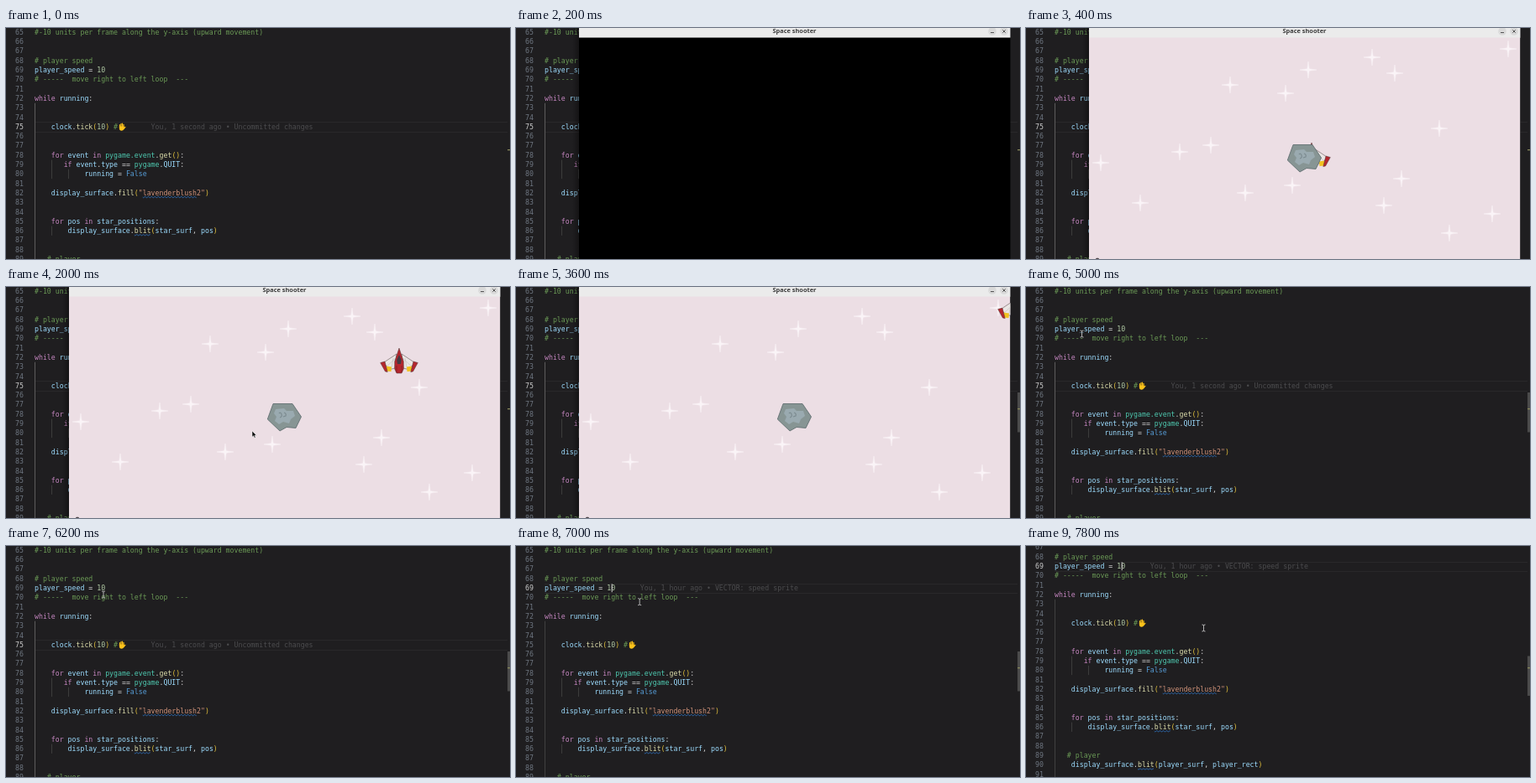
Write an HTML page that moves like this. It is 600x276 px and loops after 8000 ms.

```html
<!DOCTYPE html>
<html lang="en">
<head>
<meta charset="utf-8">
<title>Space shooter</title>
<style>
html, body { margin: 0; width: 100%; height: 100%; overflow: hidden; background: #1f1e20; }
svg { display: block; width: 600px; height: 276px; }
text { white-space: pre; font: 8.22px "DejaVu Sans Mono", monospace; }
.title { font: 700 7.4px "Open Sans", sans-serif; }
</style>
</head>
<body>
<svg id="stage" viewBox="0 0 600 276"></svg>
<script>
const NS = 'http://www.w3.org/2000/svg';
const STEP = 200, LOOP = 8000;
const CHAR = 4.95, ROW = 11.3, LEFT = 34;
const OPEN = 1, CLOSE = 19, CLICK = 33;
const stage = document.getElementById('stage');

function add(parent, tag, attrs = {}, text) {
  const el = document.createElementNS(NS, tag);
  for (const k in attrs) el.setAttribute(k, attrs[k]);
  if (text !== undefined) el.textContent = text;
  return parent.appendChild(el);
}
const path = (parent, d, fill, more) => add(parent, 'path', { d, fill, ...more });
const show = (el, on) => el.setAttribute('display', on ? 'inline' : 'none');
const move = (el, x, y) => el.setAttribute('transform', `translate(${x} ${y})`);
const rowY = n => 5 + (n - 65) * ROW;
const colX = c => LEFT + c * CHAR;

// Code editor
const code = {
  65: '#-10 units per frame along the y-axis (upward movement)',
  68: '# player speed',
  69: 'player_speed = 10',
  70: '# -----  move right to left loop  ---',
  72: 'while running:',
  75: '    clock.tick(10) #',
  78: '    for event in pygame.event.get():',
  79: '       if event.type == pygame.QUIT:',
  80: '            running = False',
  82: '    display_surface.fill("lavenderblush2")',
  85: '    for pos in star_positions:',
  86: '        display_surface.blit(star_surf, pos)',
  89: '   # player',
  90: '    display_surface.blit(player_surf, player_rect)'
};
const rules = [
  [/^#.*/, '#6a9955'],
  [/^"[^"]*"/, '#ce9178'],
  [/^(while|for|in|if)\b/, '#c586c0'],
  [/^False\b/, '#569cd6'],
  [/^pygame(\.event)?/, '#4ec9b0'],
  [/^\d+/, '#b5cea8'],
  [/^\w+(?=\()/, '#dcdcaa'],
  [/^[()]/, '#e3c23c'],
  [/^[a-z_]\w*/i, '#9cdcfe'],
  [/^(\s+|.)/, '#d4d4d4']
];

function codeLine(parent, n) {
  const line = add(parent, 'text', { x: LEFT, y: rowY(n) + 2.8 });
  let src = code[n];
  while (src) {
    const [re, fill] = rules.find(r => r[0].test(src));
    const word = src.match(re)[0];
    add(line, 'tspan', { fill }, word);
    src = src.slice(word.length);
  }
}

function squiggle(parent, n, word) {
  const x = colX(code[n].indexOf(word));
  let d = '';
  for (let i = 0; i <= word.length * CHAR; i++) {
    d += `${i ? 'L' : 'M'}${x + i} ${rowY(n) + 5 + 0.7 * Math.sin(i * 1.6)}`;
  }
  path(parent, d, 'none', { stroke: '#3794ff', 'stroke-width': 0.6 });
}

function guide(parent, col, from, to, stroke) {
  const x = Math.round(colX(col)) + 0.5;
  return path(parent, `M${x} ${rowY(from - 0.5)}V${rowY(to + 0.5)}`, 'none', { stroke });
}

function lineNote(parent, n, col, words) {
  const g = add(parent, 'g');
  for (const y of [n - 0.5, n + 0.5]) {
    path(g, `M${LEFT} ${Math.round(rowY(y)) + 0.5}H597`, 'none', { stroke: '#29282a' });
  }
  add(g, 'text', { x: colX(col), y: rowY(n) + 2.8, fill: '#4c4c4e' }, words);
  return g;
}

add(stage, 'rect', { width: 600, height: 276, fill: '#1f1e20' });
const editor = add(stage, 'g');
const noteA = lineNote(editor, 75, 28, 'You, 1 second ago • Uncommitted changes');
const noteB = lineNote(editor, 69, 23, 'You, 1 hour ago • VECTOR: speed sprite');
const mainGuide = guide(editor, 0, 73, 93, '#5c5c5c');
guide(editor, 4, 79, 80, '#3c3c3c');
guide(editor, 8, 80, 80, '#3c3c3c');
guide(editor, 4, 86, 86, '#3c3c3c');

const numbers = {};
for (let n = 64; n < 93; n++) {
  numbers[n] = add(editor, 'text', { x: 21, y: rowY(n) + 2.8, 'text-anchor': 'end' }, n);
  if (code[n]) codeLine(editor, n);
}
squiggle(editor, 82, 'lavenderblush');
squiggle(editor, 86, 'blit');
squiggle(editor, 90, 'blit');

const hand = add(editor, 'g', { transform: `translate(138 ${rowY(75)}) scale(-1 1)` });
path(hand, 'M-2 1V-2.6M-.5 0V-4M1 0V-3.7M2.5 1V-2.4M-2 2.5L-3.9 .3', 'none',
  { stroke: '#fcc21b', 'stroke-width': 1.2, 'stroke-linecap': 'round' });
path(hand, 'M-2.6-.5H3.1V2Q3 4.8 .5 4.8Q-1.6 4.8-2.6 2.4Z', '#fcc21b');

const caret = add(editor, 'rect', { x: colX(16) + 0.5, y: rowY(69) - 5, width: 1, height: 10, fill: '#d0d0d0' });

// Scrollbar
const thumb = add(stage, 'rect', { x: 597, width: 3, height: 47.5, fill: '#4b4b4b' });
add(stage, 'rect', { x: 597, y: 145, width: 3, height: 1.3, fill: '#86865a' });

// Game window
const defs = add(stage, 'defs');
const shade = add(defs, 'linearGradient', { id: 'shade' });
add(shade, 'stop', { offset: 0, 'stop-opacity': 0 });
add(shade, 'stop', { offset: 1, 'stop-opacity': 0.35 });
const clip = add(defs, 'clipPath', { id: 'inside' });
add(clip, 'rect', { x: 75, y: 11, width: 513.5, height: 265 });

const game = add(stage, 'g');
add(game, 'rect', { x: 67, width: 8, height: 276, fill: 'url(#shade)' });
add(game, 'rect', { x: 75, width: 513.5, height: 276, fill: '#000' });
const field = add(game, 'g', { 'clip-path': 'url(#inside)' });
add(field, 'rect', { x: 75, width: 513.5, height: 276, fill: '#ecdee4' });

const stars = [[574, 25], [412, 35], [336, 50], [439, 54], [243, 68], [309, 78], [492, 120],
  [220, 140], [183, 148], [89, 161], [447, 180], [317, 188], [261, 197], [136, 209],
  [426, 212], [555, 222], [504, 245]];
for (const [x, y] of stars) {
  path(field, `M${x} ${y - 10}l1.2 8.8 8.8 1.2-8.8 1.2-1.2 8.8-1.2-8.8-8.8-1.2 8.8-1.2z`,
    '#faf4f7', { stroke: '#f8f0f4', 'stroke-width': 0.5 });
}

const ship = add(field, 'g');
const ink = { stroke: '#4a3838', 'stroke-width': 0.5, 'stroke-linejoin': 'round' };
for (const side of [-1, 1]) {
  const wing = add(ship, 'g', { transform: `scale(${side} 1)` });
  path(wing, 'M3-8L18 2 13 11 5 9Z', '#eae6e4', ink);
  path(wing, 'M7-3L9 8M3-4L15 7', 'none', { stroke: '#b9b3b3', 'stroke-width': 0.5 });
  path(wing, 'M9 7.5L15 6.5 15 12.5 9.5 13Z', '#f2c220');
  path(wing, 'M17 1L22.3 2.5 16.5 13 13.8 13.5Z', '#b4272e', ink);
}
path(ship, 'M0-15L2.3-8 5.3 1 5.3 10 3 15H-3L-5.3 10V1L-2.3-8Z', '#b4272e', ink);
path(ship, 'M0-7L2.8-1 2 4H-2L-2.8-1Z', '#453a42');
path(ship, 'M-3 6V14M3 6V14', 'none', { stroke: '#7c1b22', 'stroke-width': 0.7 });

path(field, 'M318 139.5L341 139.5 351.5 155 345 168.5 334 167.5 326 172 311.3 158Z', '#879594',
  { stroke: '#59686a', 'stroke-width': 0.8 });
path(field, 'M321 146L331 145 334 148 342 148 344 154 339 158 337 163 330 161 325 164 320 160 322 155 319 151Z', '#9aaab0');
path(field, 'M325 151q2-2 3 1t-2 4M331 150q3 1 2 4l-3 1', 'none', { stroke: '#7c8b90', 'stroke-width': 1.2 });
add(field, 'ellipse', { cx: 85, cy: 276, rx: 2, ry: 1.2, fill: '#4a4347' });

add(game, 'rect', { x: 75, width: 513.5, height: 11.5, fill: '#ebebeb' });
add(game, 'text', { class: 'title', x: 331.5, y: 6.4, 'text-anchor': 'middle', fill: '#3a3a3a' }, 'Space shooter');
for (const x of [567, 581]) add(game, 'circle', { cx: x, cy: 4, r: 4.8, fill: '#d9d9d9' });
path(game, 'M565 5.5H569M579.3 2.3L582.7 5.7M582.7 2.3L579.3 5.7', 'none', { stroke: '#444', 'stroke-width': 0.9 });

// Pointers
const arrow = path(stage, 'M0 0V7.2L1.7 5.7 2.8 8.3 4.1 7.7 3 5.2H5.2Z', '#111', { stroke: '#fff', 'stroke-width': 0.5 });
const beam = path(stage, 'M-2-4Q0-4 0-3Q0-4 2-4M0-3V3M-2 4Q0 4 0 3Q0 4 2 4', 'none', { stroke: '#d8d8d8', 'stroke-width': 0.8 });

// Keys are [step, x, y]; linear between them
const arrowKeys = [[5, 310, 240], [7, 293, 174], [10, 293, 172], [12, 76, 165]];
const beamKeys = [[21, 14, 150], [24, 67, 56], [26, 66, 56], [28, 295, 159],
  [31, 116, 58], [32, 115, 51], [34, 115, 51], [37, 211.5, 98], [40, 211.5, 98]];

function follow(el, keys, n) {
  const i = keys.findIndex((k, j) => j && n >= keys[j - 1][0] && n <= k[0]);
  show(el, i > 0);
  if (i < 1) return;
  const [a, ax, ay] = keys[i - 1], [b, bx, by] = keys[i];
  const p = (n - a) / (b - a);
  move(el, ax + (bx - ax) * p, ay + (by - ay) * p);
}

function draw(t) {
  const n = Math.floor(t / STEP);
  const clicked = n >= CLICK;
  const scroll = 26 * Math.min(1, Math.max(0, (n - 36) / 3));

  move(editor, 0, -scroll);
  show(noteA, !clicked);
  show(noteB, clicked);
  show(caret, clicked && (n - CLICK) * STEP % 1000 < 500);
  mainGuide.setAttribute('stroke', clicked ? '#404040' : '#5c5c5c');
  for (const k in numbers) {
    numbers[k].setAttribute('fill', +k === (clicked ? 69 : 75) ? '#cccccc' : '#6e7681');
  }

  show(thumb, n >= 21 || (n >= 13 && n <= CLOSE));
  thumb.setAttribute('opacity', n === CLOSE ? 0.25 : 1);
  thumb.setAttribute('y', 126 + scroll * 0.21);

  // The window stays black until the first game tick
  show(game, n >= OPEN && n < CLOSE);
  show(field, n > OPEN);
  move(ship, 308 + 16 * n, 168 - 8 * n);

  follow(arrow, arrowKeys, n);
  follow(beam, beamKeys, n);
}

function tick() {
  draw(performance.now() % LOOP);
  requestAnimationFrame(tick);
}
tick();
</script>
</body>
</html>
```
